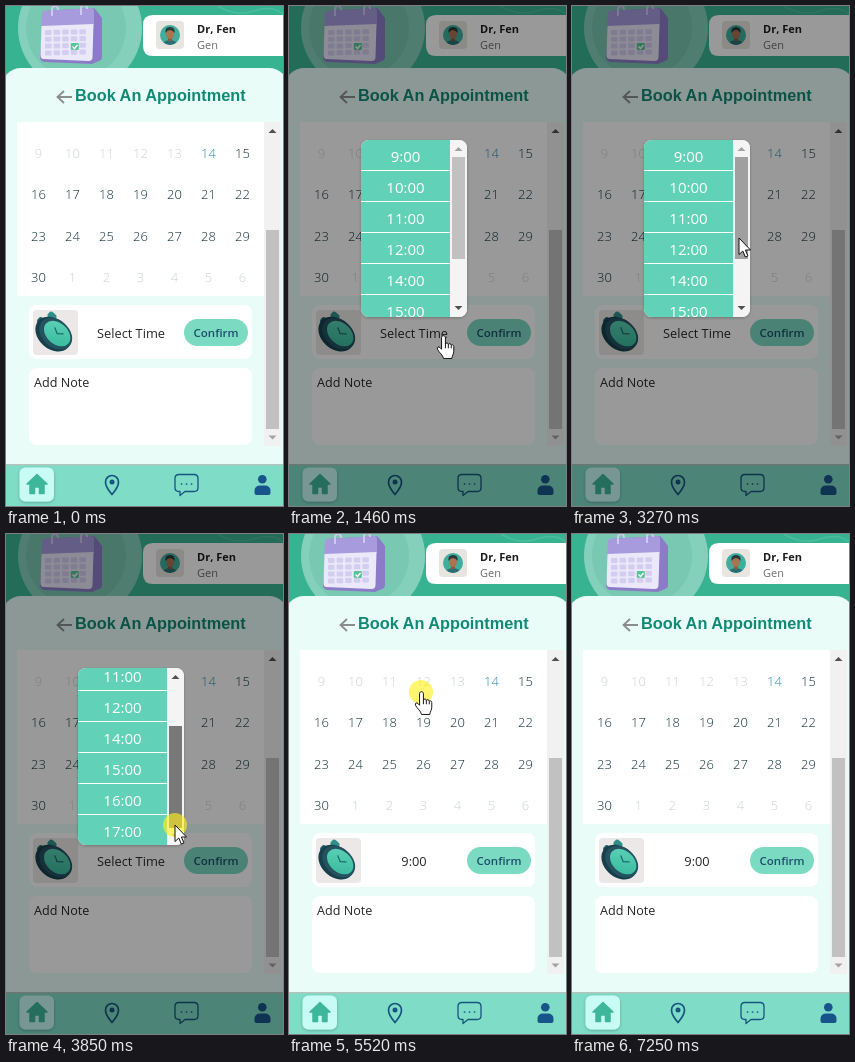
An HTML page for the animation above (7.75 s loop, 277 by 500 pixels).

```html
<!DOCTYPE html>
<html lang="en">
<head>
<meta charset="utf-8">
<title>Book An Appointment</title>
<style>
  html, body { margin: 0; width: 100%; height: 100%; overflow: hidden; background: #e9fcf8; }
  svg { display: block; width: 100vw; height: 100vh; font-family: "Open Sans", "Noto Sans", sans-serif; }
  .mid { text-anchor: middle; }
  .bold { font-weight: 700; }
  .line { fill: none; stroke: #17547f; stroke-width: 1.7; stroke-linecap: round; stroke-linejoin: round; }
  .thin { stroke-width: 1.3; }
</style>
</head>
<body>
<svg viewBox="0 0 277 500">
  <defs>
    <clipPath id="modalShape"><rect x="72" y="134" width="106" height="177" rx="8"/></clipPath>
    <clipPath id="avatarShape"><circle cx="164" cy="29" r="10"/></clipPath>
    <linearGradient id="dial" x2="1" y2="1"><stop stop-color="#5fd3b8"/><stop offset="1" stop-color="#35b89c"/></linearGradient>
    <filter id="shadow" x="-20%" y="-20%" width="140%" height="140%">
      <feDropShadow dx="0" dy="1" stdDeviation="1.5" flood-opacity=".25"/>
    </filter>
  </defs>

  <!-- header -->
  <rect width="277" height="90" fill="#38b392"/>
  <path d="M212 0q18 11 36 5t29 3" fill="none" stroke="#4dbd9f" stroke-width="1.5"/>
  <circle cx="74" cy="22" r="62" fill="#84d0bb"/>
  <circle cx="70" cy="22" r="50" fill="#79c8b2"/>
  <g id="calendarIcon">
    <path d="M38 5L86 2q3 0 4 2l6 8v39q0 3-3 4l-7 3-48-2q-4-1-4-5z" fill="#8c7cc8"/>
    <path d="M38 5L85 2q3 0 3 3v14l-53 2 1-13q0-3 2-3z" fill="#a79bdd"/>
    <path d="M35.500 20l52-2-1 33q0 4-4 4l-45-2q-3 0-3-4z" fill="#ebe8fa"/>
    <path d="M46 10V4q0-4 3-4t3 4M75 9V3q0-4 3-4t3 4" fill="none" stroke="#cfc8f0" stroke-width="2"/>
  </g>
  <path d="M277 9H147q-10 0-10 10v21q0 10 10 10h130z" fill="#fff"/>
  <rect x="150" y="15" width="28" height="28" rx="4" fill="#e8e5e1"/>
  <g clip-path="url(#avatarShape)">
    <rect x="150" y="15" width="28" height="28" fill="#3fae9c"/>
    <ellipse cx="164" cy="40" rx="8" ry="6" fill="#2b6f74"/>
    <rect x="162" y="30" width="4" height="5" fill="#8c5a3c"/>
    <ellipse cx="164" cy="28" rx="4" ry="5" fill="#a9744f"/>
    <path d="M159.500 27q-1-6 4.500-6t4.500 6q-2-3-4.500-3t-4.500 3z" fill="#28383d"/>
  </g>
  <text x="191" y="27" class="bold" font-size="11" fill="#1c1c1c">Dr, Fen</text>
  <text x="191" y="43" font-size="11" fill="#6c6c6c">Gen</text>

  <!-- booking panel -->
  <rect x="-4" y="62" width="286" height="420" rx="19" fill="#e9fcf8"/>
  <path d="M66 91H52m6-6l-6.500 6 6.500 6" fill="none" stroke="#8b8d8d" stroke-width="1.800"/>
  <text x="69" y="95" class="bold" font-size="16.300" fill="#118a75" font-family="Liberation Sans, Arial, sans-serif">Book An Appointment</text>
  <rect x="11" y="116" width="247" height="174" fill="#fff"/>
  <g id="days" class="mid" font-size="13" font-weight="300"></g>

  <rect x="258" y="116" width="17" height="324" fill="#f1f1f1"/>
  <rect x="260" y="224" width="13" height="199" fill="#c1c1c1"/>
  <path d="M262.500 127h8l-4-4z" fill="#505050"/>
  <path d="M262.500 429.500h8l-4 4z" fill="#a3a3a3"/>

  <rect x="23" y="299" width="223" height="54" rx="8" fill="#fff"/>
  <rect x="27" y="304" width="45" height="45" rx="4" fill="#ebe8e7"/>
  <g transform="rotate(42 49 327)">
    <rect x="31" y="313" width="9" height="7" rx="3" fill="#2f8f88"/>
    <rect x="27" y="324" width="6" height="7" rx="3" fill="#1f5f69"/>
    <ellipse cx="48.500" cy="329" rx="20" ry="15" fill="#173f4c"/>
    <ellipse cx="50" cy="327" rx="18.500" ry="13.500" fill="#24525f"/>
    <ellipse cx="51" cy="326" rx="15" ry="10.500" fill="url(#dial)"/>
    <path d="M45 323l6 3 5-4" fill="none" stroke="#1d6465" stroke-width="1.200"/>
  </g>
  <text id="time" x="125" y="332" class="mid" font-size="12.800" fill="#262626"></text>
  <rect x="178" y="313" width="64" height="27" rx="13.500" fill="#7bdac2"/>
  <text x="210" y="331" class="mid" font-weight="600" font-size="11.500" fill="#1d4f6b">Confirm</text>
  <rect x="23" y="362" width="223" height="77" rx="8" fill="#fff"/>
  <text x="28" y="381" font-size="12.600" fill="#262626">Add Note</text>

  <!-- navigation -->
  <rect y="458" width="277" height="42" fill="#b3c4bf"/>
  <rect y="459.500" width="277" height="41" fill="#7fdcc7"/>
  <rect x="13.500" y="461.500" width="34.500" height="34" rx="6" fill="#c8fbf6" filter="url(#shadow)"/>
  <path d="M31 468.500L21 478h3v9.500h4.500V481h5v6.500H38V478h3z" fill="#3eb69b" stroke="#3eb69b" stroke-width="1.500" stroke-linejoin="round"/>
  <path class="line" d="M106 488.500q-6.500-7.500-6.500-12.500a6.500 6.500 0 0 1 13 0q0 5-6.500 12.500z"/>
  <circle cx="106" cy="476" r="2.500" fill="#17547f"/>
  <path class="line thin" d="M173 468.500h15q4 0 4 4v9q0 4-4 4h-9l-5 4v-4h-1q-4 0-4-4v-9q0-4 4-4z"/>
  <path class="line" d="M175.500 478h.1m4.900 0h.1m4.900 0h.1"/>
  <circle cx="256.300" cy="473.300" r="4.300" fill="#17548a"/>
  <path d="M248.500 487v-2q0-5.500 6-5.500h4q6 0 6 5.500v2q0 2-2 2h-12q-2 0-2-2z" fill="#17548a"/>

  <!-- time picker -->
  <g id="modal">
    <rect width="277" height="500" opacity=".4"/>
    <rect x="72" y="134" width="106" height="177" rx="8" fill="#f1f1f1" filter="url(#shadow)"/>
    <g clip-path="url(#modalShape)">
      <g id="hours" class="mid" font-size="15" fill="#fff"></g>
      <rect x="161" y="134" width="17" height="177" fill="#f4f4f4"/>
      <rect id="thumb" x="163" width="13" height="102"/>
      <path id="up" d="M165.500 145h8l-4-4z"/>
      <path id="down" d="M165.500 300h8l-4 4z"/>
    </g>
  </g>

  <circle id="press" r="12" fill="#fff01e" opacity=".64"/>
  <g id="cursor" fill="#fff" stroke="#111" stroke-linejoin="round">
    <path id="arrow" d="M0 0V16.500L3.800 13l2.500 6 2.600-1.100L6.400 12h5.100z"/>
    <g id="hand" transform="translate(-6.300 -1.300) scale(.97)">
      <path d="M5 3c0-2.600 4-2.600 4 0v6.500c.5-1.500 3-1.200 3 .6 .6-1.400 3-1 3 .8 .8-1 2.600-.4 2.600 1.200V17c0 3-1.600 4-2 7.500H7c-.5-3.500-4.500-6-6.200-9.500-.8-2 1.200-3.200 2.600-1.800L5 15z"/>
      <path d="M9 9v5m3-4v4m3-3v3" fill="none"/>
    </g>
  </g>
</svg>
<script>
const LOOP = 7750;
const $ = id => document.getElementById(id);

function add(parent, tag, attrs, text = "") {
  const node = document.createElementNS("http://www.w3.org/2000/svg", tag);
  for (const key in attrs) node.setAttribute(key, attrs[key]);
  node.textContent = text;
  $(parent).append(node);
}

// Page cells of the calendar picture
for (let row = 0; row < 4; row++)
  for (let col = 0; col < 5; col++) {
    const checked = row === 2 && col === 3;
    add("calendarIcon", "rect", {
      x: 39 + col * 8.6, y: 24 + row * 6.8 - col * 0.2, width: checked ? 8 : 6.5, height: checked ? 7 : 5,
      rx: 1, fill: checked ? "#58c596" : "#d3cdf0"
    });
  }
add("calendarIcon", "path", { d: "M66.500 40.500l2 2 3-3.500", fill: "none", stroke: "#fff", "stroke-width": 1.3 });

// Days 9 to 30, then the first six of the next month
for (let i = 0; i < 28; i++) {
  const day = i + 9, disabled = day < 14 || day > 30;
  add("days", "text", {
    x: 32.5 + (i % 7) * 34, y: 151.5 + Math.floor(i / 7) * 41.6,
    fill: disabled ? "#ccd3d2" : day === 14 ? "#2b86a8" : "#14333b"
  }, day > 30 ? day - 30 : day);
}

["9", "10", "11", "12", "14", "15", "16", "17"].forEach((hour, i) => {
  const y = 134 + i * 31;
  add("hours", "rect", { x: 72, y, width: 89, height: 30, fill: "#61d2b8" });
  add("hours", "rect", { x: 72, y: y + 30, width: 89, height: 1 });
  add("hours", "text", { x: 116.5, y: y + 21.5 }, hour + ":00");
});

// Pointer moves: start, end, number of steps, destination, ease-out power
const START = [247, 518];
const MOVES = [
  [130, 870, 11, 154, 330, 2],
  [1880, 2470, 9, 143, 150, 2],
  [2690, 3420, 11, 169, 239, 2],
  [3490, 3850, 6, 169, 291, 1.5],
  [4220, 4700, 7, 169, 207, 1.5],
  [4850, 4940, 2, 155, 183, 1],
  [5010, 5230, 4, 132, 158, 1.5],
  [6100, 6460, 6, 142, 341, 2],
  [6960, 7250, 5, 237, 530, 1]
];

function pointerAt(t) {
  let [x, y] = START;
  for (const [start, end, steps, toX, toY, power] of MOVES) {
    if (t < start) break;
    const step = Math.floor((t - start) / (end - start) * (steps - 1) + 0.01) + 1;
    const eased = 1 - (1 - Math.min(1, step / steps)) ** power;
    x += (toX - x) * eased;
    y += (toY - y) * eased;
  }
  return [Math.round(x), Math.round(y)];
}

const within = (t, from, to) => t >= from && t < to;
const clamp = (v, lo, hi) => Math.min(hi, Math.max(lo, v));
const show = (id, visible) => $(id).style.display = visible ? "" : "none";
const set = (id, name, value) => $(id).setAttribute(name, value);

function draw(t) {
  const [x, y] = pointerAt(t);
  const open = within(t, 1460, 5520);
  const dragging = within(t, 3490, 4790);
  const scroll = dragging ? clamp(y - 239, 0, 41) : 0;
  const hover = x > 161 && y > 151 && y < 253;
  const hand = open ? x < 161 : y < 336;

  show("modal", open);
  set("hours", "transform", `translate(0 ${-Math.round(scroll / 41 * 70)})`);
  set("thumb", "y", 151 + scroll);
  set("thumb", "fill", dragging ? "#787878" : hover ? "#a0a0a0" : "#c1c1c1");
  set("up", "fill", scroll > 0 ? "#505050" : "#a3a3a3");
  set("down", "fill", scroll < 41 ? "#505050" : "#a3a3a3");
  $("time").textContent = t < 5520 ? "Select Time" : "9:00";

  show("cursor", within(t, 130, 7250));
  show("hand", hand);
  show("arrow", !hand);
  set("cursor", "transform", `translate(${x} ${y})`);
  show("press", within(t, 1370, 1460) || dragging || within(t, 5450, 5580));
  set("press", "cx", x);
  set("press", "cy", y);
}

const begin = performance.now();
function tick() {
  draw((performance.now() - begin) % LOOP);
  requestAnimationFrame(tick);
}
tick();
</script>
</body>
</html>
```
